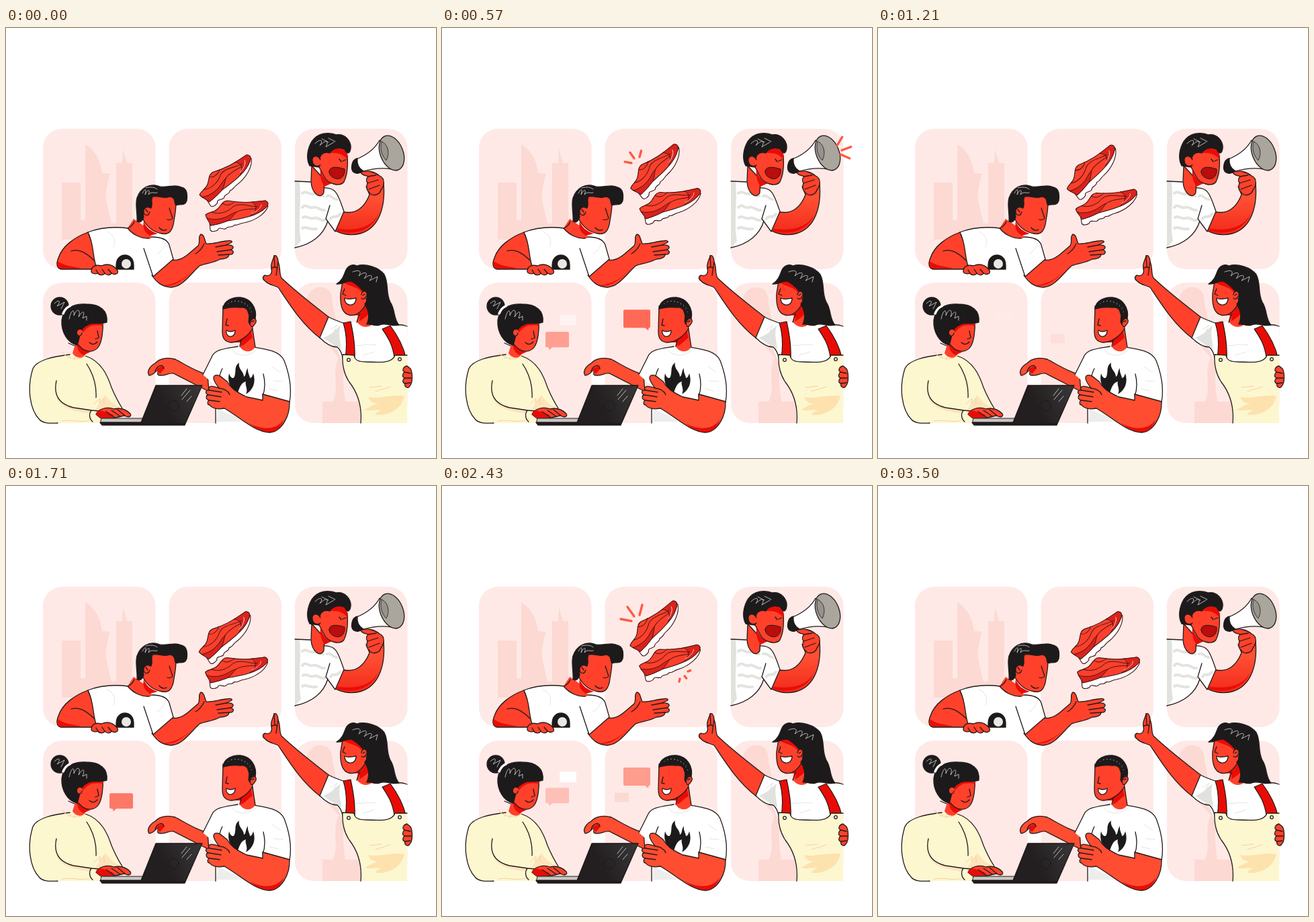
Recreate the animation shown at these times as an HTML page. Size 640 by 640 pixels, loop 3.57 s.

```html
<!DOCTYPE html>
<html lang="en">
<head>
<meta charset="utf-8">
<title>Community</title>
<style>
html, body { margin: 0; width: 100%; height: 100%; overflow: hidden; background: #fff; }
svg { display: block; width: 100vw; height: 100vh; }
path, circle, ellipse { stroke-linecap: round; stroke-linejoin: round; }
.s, .w, .c, .k, .l { stroke: #231a1a; stroke-width: 1.3; }
.s { fill: #ff412b; }
.a { fill: #ff4d31; }
.w { fill: #fff; }
.c { fill: #fdf7d0; }
.k { fill: #1d1a1b; }
.l { fill: none; }
.r { fill: #e90c06; }
.g { fill: #e1e2de; }
.p { fill: #fdd9d4; }
.h { fill: none; stroke: #ddd; stroke-width: .8; }
.t { fill: none; stroke: #e3e3df; stroke-width: 4; }
.f { fill: #fa402c; }
.y { fill: none; stroke: #f8cf9c; stroke-width: 1; }
.n { stroke: none; }
.spark path { fill: none; stroke: #ff5a43; stroke-width: 3.4; }
.shoe { stroke: #3a1013; stroke-width: 1.1; }
</style>
</head>
<body>
<svg viewBox="0 0 640 640">
<defs>
  <linearGradient id="dusk" x2="0" y2="1"><stop offset=".3" stop-color="#ff4f33"/><stop offset="1" stop-color="#f22a1a"/></linearGradient>
  <linearGradient id="lid" x2="1" y2="-.3"><stop offset=".2" stop-color="#231f20"/><stop offset="1" stop-color="#3c3a3a"/></linearGradient>
  <g id="shoe" class="shoe">
    <path fill="#fff" d="M303 288L304 300C305 304 311 303 315 301C317 295 322 300 327 299C331 293 336 299 340 293C344 295 349 290 354 290C370 287 386 277 390 265L386 258Z"/>
    <path class="f" d="M297 278C303 273 309 275 314 270C320 265 322 257 330 257C345 260 367 260 386 257C391 259 391 263 387 267C374 280 350 284 330 287C320 291 311 293 305 294C303 288 298 284 297 278Z"/>
    <path fill="#d9231b" stroke-width=".8" d="M299 283C309 286 319 285 328 281C334 278 338 275 343 274C338 279 335 284 330 287C320 291 311 293 305 294C303 290 301 287 299 283ZM366 259L386 257C391 259 391 263 387 267C380 274 371 278 363 280C373 273 375 265 366 259Z"/>
    <path fill="none" stroke-width=".9" d="M306 274C318 279 331 273 338 266C348 259 362 266 374 266M322 261C328 266 336 263 341 258M343 274C352 269 361 270 372 269"/>
    <path fill="none" stroke="#fff" stroke-width=".7" d="M380 263C380 268 373 273 366 276"/>
  </g>
</defs>

<g id="panels" fill="#fee9e6"></g>

<g class="p">
  <path d="M83 230H111V285L118 287V173C134 183 141 198 143 216L155 217C150 235 147 247 150 261L157 291H164V201H173L174 180L180 201H188V300L120 315H83Z"/>
  <path fill="#fee9e6" d="M111 230H118V286H111ZM155 217H164V290H157C150 262 147 240 155 217Z"/>
  <path d="M446 412C447 396 456 386 468 386C482 386 486 396 486 410L500 478L504 500C500 515 502 535 505 556H527V588H471V556H486C497 535 484 515 495 490L450 440Z"/>
</g>

<!-- catcher -->
<path class="s" d="M122 304C103 311 84 324 78 342C74 352 76 358 82 359H140L130 325Z"/>
<path class="r" d="M77 347C76 354 77 358 82 358H112C98 354 88 355 77 347Z"/>
<path class="l" d="M97 332C107 329 117 332 131 346"/>
<path class="s" d="M247 345C256 347 265 342 272 336L286 324C290 318 285 311 290 307C295 307 295 314 298 321C308 322 317 318 328 317C335 315 339 318 334 320L328 323C338 322 341 327 335 330C341 333 338 338 332 337C332 342 325 344 319 344C308 350 298 350 288 354C274 367 263 385 246 386C231 385 224 378 217 368Z"/>
<path class="r" d="M234 383C252 387 267 372 281 358C268 371 256 381 234 383Z"/>
<path class="l" d="M312 326L328 323M314 333L335 330M316 338L332 337M295 321C292 328 289 332 282 336"/>
<path fill="#fff" d="M122 304C140 297 160 295 182 298C192 309 215 310 236 315C243 320 245 332 249 344L219 370L213 359H136C128 343 132 323 122 304Z"/>
<path class="l" d="M122 304C140 297 158 295 182 298M216 311C230 311 240 314 243 323L249 344L219 370L205 328M122 304C132 323 128 343 136 359"/>
<path class="h" d="M150 303C161 307 164 317 160 326M225 336C231 333 236 325 238 319"/>
<path class="s n" d="M190 284L181 298C190 309 204 315 216 313L216 302Z"/>
<path class="l" d="M191 288C189 293 186 296 181 298C190 309 203 314 213 313"/>
<path class="r" d="M205 288C209 298 216 303 226 306L214 309C206 304 203 298 205 288Z"/>
<path class="s" d="M204 249H252C255 260 252 275 250 287C248 303 242 308 232 306C220 304 211 298 204 285Z"/>
<path class="k" d="M195 288C196 276 192 263 195 253C200 238 214 231 226 235C236 240 250 231 261 237C271 239 270 250 269 257C266 266 258 261 253 264C249 258 254 254 244 251C234 255 227 249 218 251C215 257 219 262 216 268C208 264 202 272 205 281C203 287 200 291 195 288Z"/>
<path class="s" d="M215 268C206 263 202 274 207 278C211 280 213 277 214 274"/>
<path class="l" d="M243 268L248 283C246 286 243 286 240 285M228 297C231 301 235 302 239 300M208 270L211 274"/>
<path class="h" d="M203 246C208 237 209 240 207 248C212 238 215 241 212 248C218 242 220 247 225 245M208 238C216 236 222 237 225 240"/>
<path class="k" d="M164 359V353C164 333 190 333 190 353V359Z"/><circle cx="179" cy="351" r="7" fill="#e8e8e4"/>
<path class="s" d="M127 361C128 354 134 352 142 354C151 350 160 352 166 361C168 366 162 368 157 365C155 369 149 368 147 365C145 369 138 368 137 365C132 367 126 365 127 361Z"/>
<path class="l" d="M137 365L134 360M147 365L143 359M157 365L152 359"/>

<g id="low"><use href="#shoe"/></g>
<g id="high"><use href="#shoe"/></g>
<g id="sparkA" class="spark"><path d="M282 201L266 198"/><path d="M286 194L276 180"/><path d="M294 192L298 177"/></g>
<g id="sparkB" class="spark"><path d="M354 287L351 299"/><path d="M361 283L369 292"/><path d="M366 276L377 272"/></g>

<!-- announcer -->
<path class="s" style="fill:url(#dusk)" d="M500 273C521 279 534 266 541 248L536 236L562 231C565 265 556 298 527 306C512 310 496 306 488 300Z"/>
<path class="r" d="M493 302C516 309 543 303 554 278C543 296 526 302 493 299Z"/>
<path fill="#fff" d="M430 228L453 229C460 239 472 240 483 238C494 246 498 258 503 273L490 303L479 287C473 308 455 322 430 327Z"/>
<path class="g" d="M430 228H437C440 260 434 290 439 317L430 327Z"/>
<path class="t" d="M441 246C447 241 450 248 456 247S466 251 472 250M441 267C447 260 451 270 457 267S468 273 474 271M442 282C448 278 452 286 458 283S468 288 474 286M441 298C447 294 451 301 462 299M478 250C484 247 486 255 492 255M483 284C487 277 491 285 497 277"/>
<path class="l" d="M430 228L453 229M473 238C492 237 494 248 503 273L490 303L476 284L482 264M479 287C473 308 455 322 430 327"/>
<path class="s" d="M455 205L454 229C455 246 468 256 473 245L474 226Z"/>
<path class="r" d="M468 211C472 223 478 230 485 231L474 236C469 229 467 220 468 211Z"/>
<path class="s" d="M467 178H504L508 190C509 203 508 219 503 229C497 237 479 232 474 222L466 207Z"/>
<path class="k" d="M452 205C446 194 449 179 455 169C465 155 480 155 492 159C505 157 514 169 513 179C512 188 507 188 504 181C497 177 487 179 482 186C474 184 467 187 467 196L466 207Z"/>
<path class="s" d="M468 196C463 187 455 191 456 198C457 206 464 207 468 204"/>
<path class="r" d="M483 186C488 178 500 178 504 183C509 187 509 190 508 195C499 186 494 186 483 186Z"/>
<path fill="#b90e0d" stroke="#231a1a" d="M481 214C481 207 489 205 504 210C505 218 500 227 490 224C485 222 481 219 481 214Z"/>
<path class="l" d="M496 195L499 199M506 196L501 198"/>
<path class="h" d="M460 172C468 164 473 167 467 175C477 165 481 168 476 177L488 170M470 165L480 170M480 164L490 169"/>
<path class="w" d="M556 167C548 182 534 190 522 195C517 203 520 211 529 214C546 209 566 207 581 212Z"/>
<path class="k" d="M523 194C514 196 512 211 518 215C523 218 528 215 532 213C525 209 522 202 523 194Z"/>
<ellipse cx="574" cy="186" rx="17" ry="27" transform="rotate(-22 574 186)" fill="#aaa59d" stroke="#231a1a" stroke-width="1.3"/>
<path fill="#96928c" stroke="#231a1a" stroke-width=".8" d="M559 169C568 172 572 186 566 197C559 190 556 179 559 169Z"/>
<path class="s" d="M528 215C537 210 550 215 556 220C565 224 563 235 558 241C556 249 545 251 541 245C536 241 536 235 538 231C535 227 537 223 539 221C535 219 530 220 528 215Z"/>
<path class="l" d="M539 221L551 219M538 231L554 226M540 240L556 234"/>
<g id="sparkC" class="spark"><path d="M588 175L597 160"/><path d="M595 182L611 176"/><path d="M593 188L609 195"/></g>

<g id="bubbles"></g>

<!-- typist -->
<path class="c n" d="M95 486C70 489 46 494 40 507C31 535 35 568 50 583C57 589 65 588 80 588H145L173 566C166 554 162 546 157 535C151 517 143 496 118 488Z"/>
<path fill="#fde4bd" d="M74 548C83 562 104 568 127 569L126 574C106 571 82 569 74 548ZM148 546C157 560 164 562 173 566L160 571C150 565 139 569 132 569Z"/>
<path class="l" d="M95 486C70 489 46 494 40 507C31 535 35 568 50 583C56 589 65 588 77 588M118 488C142 496 151 517 157 535C162 547 166 555 173 566M75 525C70 548 80 560 100 565L127 569C123 574 124 582 129 586M120 500C130 515 135 530 134 550M127 569L138 570"/>
<path class="y" d="M84 482C91 493 110 496 119 487M87 488L91 484M93 492L96 487M101 494L103 489M110 493L110 488M131 560L140 551L139 559L146 551V560M83 585C100 582 111 588 124 584"/>
<path class="s n" d="M104 468L99 484C104 492 114 493 118 486L119 477Z"/>
<path class="r" d="M106 469C111 478 118 481 126 482L115 487C108 483 105 476 106 469Z"/>
<path class="s" d="M106 436H144C145 449 143 466 138 474C132 483 121 483 113 477L104 468Z"/>
<path class="r" d="M112 449C119 437 132 440 144 438V443C131 441 122 443 115 453Z"/>
<circle class="k" cx="80" cy="414" r="13"/>
<path class="k" d="M106 472C92 469 82 453 83 435C85 418 100 410 119 411C141 411 152 421 150 438C140 442 128 436 118 444C109 449 111 458 106 472Z"/>
<path fill="none" stroke="#fff" stroke-width="3.5" d="M85 425C87 420 90 416 95 414"/>
<path class="s" d="M113 449C105 445 103 456 108 458C111 459 113 456 113 454"/>
<path class="l" d="M136 451L138 461L133 463M124 468C128 472 133 471 136 467M93 469L102 473"/>
<path class="h" d="M94 433C97 419 102 417 101 428C106 415 112 420 108 430C115 419 118 421 114 432L120 429V435M72 410C78 404 83 405 76 414L87 408L82 418"/>
<path class="s" d="M134 575C137 567 150 563 161 567C170 565 179 568 185 574C188 579 181 580 176 577L163 580H140Z"/>
<path class="r" d="M134 575C136 568 141 569 147 571L160 576L157 580H140Z"/>
<path class="l" d="M149 571L161 579M157 569L170 578M166 568L177 577"/>

<!-- speaker -->
<path class="s a" d="M300 516C282 511 267 501 252 493C241 490 229 491 222 499C214 503 209 512 213 517C220 517 222 511 226 509C227 513 223 517 230 517C239 518 241 513 249 514L302 541Z"/>
<path class="r" d="M224 508C230 501 238 504 234 509L229 515Z"/>
<path class="l" d="M222 511C225 501 235 500 235 507"/>
<path fill="#fff" d="M345 474C327 477 312 478 307 488C300 499 296 506 293 516L314 534L312 588H382L384 546L422 556C425 535 420 513 414 495C407 481 388 478 369 475Z"/>
<path class="g" d="M315 566C330 574 340 577 352 586H313Z" opacity=".6"/>
<path class="l" d="M345 474C327 477 312 478 307 488L293 516M312 540V588M383 515C387 531 385 540 382 548M369 475C388 478 408 481 414 495C421 513 426 535 422 557L382 545M322 507C318 514 317 520 316 530"/>
<path class="h" d="M336 478C342 490 364 490 374 477M396 504L408 512M398 525L412 526M392 537L405 540"/>
<path class="k n" d="M345 543C334 538 329 527 332 514C334 521 338 523 340 519C343 511 339 504 347 498C345 508 354 511 354 519C358 517 356 511 360 506C359 513 363 517 363 521C366 521 367 517 368 514C372 526 369 538 357 545C361 537 355 532 357 526C351 528 348 533 345 543Z"/>
<path class="s n" d="M350 462L348 474C353 483 365 484 371 475L367 448Z"/>
<path class="r" d="M338 468C350 466 359 460 364 449L367 461C360 466 356 471 350 474V468Z"/>
<path class="l" d="M350 464L348 474M367 448L371 475"/>
<path class="s" d="M323 414H362L367 447C361 458 348 468 335 468C324 467 322 460 322 451Z"/>
<path class="k" d="M323 418C324 406 337 400 349 401C365 403 374 417 371 433C369 430 365 431 364 442C358 438 364 430 361 425C360 418 356 415 349 416C340 415 331 416 323 418Z"/>
<path class="s" d="M364 436C369 428 376 435 370 441C368 445 365 445 364 443"/>
<path class="w" d="M328 450C333 453 337 452 341 450C341 457 337 460 332 459C329 457 327 454 328 450Z"/>
<path class="l" d="M329 433L327 442L331 443M365 437L369 436"/>
<path class="h" stroke-dasharray=".1 5" d="M331 410C342 403 356 407 365 418M336 407C350 404 362 413 367 426"/>
<path class="s a" d="M422 556C423 578 410 601 392 602C370 601 349 580 325 566C315 568 306 566 303 561C299 561 300 555 302 554C296 552 298 546 301 546C295 543 298 538 302 539C300 532 307 532 317 536C311 528 306 520 311 517C318 515 323 522 329 526C334 535 341 541 358 549L382 554V545Z"/>
<path class="r" d="M362 588C380 598 402 600 414 582C408 596 402 602 391 601C379 600 370 595 362 588Z"/>
<path class="l" d="M302 539L321 542M301 546L320 549M302 554L318 556M317 536C327 537 331 541 333 546"/>

<!-- laptop -->
<path fill="#c9c5c1" stroke="#231a1a" d="M142 581H204L201 588H141Z"/>
<path class="k" d="M140 587H201L223 532H292L266 591H143Z"/>
<path fill="url(#lid)" d="M224 533H291L266 588H202Z"/>
<circle cx="249" cy="562" r="8" fill="none" stroke="#1d1a1b"/>
<path class="h" d="M261 547L269 537M262 553L274 539M269 556L276 548"/>

<!-- waver -->
<path class="s" d="M480 430C457 412 432 393 410 372C406 365 409 356 405 348C405 342 402 337 399 339C398 345 393 351 395 358C397 367 391 370 386 368C382 369 381 373 385 376C390 382 399 383 405 386C421 410 440 441 468 462Z"/>
<path class="l" d="M399 339L400 355M405 348L402 368M395 358C399 355 401 355 403 357"/>
<path fill="#fff" d="M480 430C493 436 508 440 520 437L560 440L597 443V500H501C498 488 495 480 490 475C481 472 474 467 467 461Z"/>
<path class="g" d="M472 461C486 456 491 448 498 443C494 457 498 466 499 478L492 475Z"/>
<path class="l" d="M505 440C496 437 487 434 480 430L467 461C475 469 485 475 493 475C498 479 500 484 501 492M584 442C590 441 594 443 597 444"/>
<path class="h" d="M483 449L493 442L488 451L497 446M517 472C531 474 537 469 551 472M532 487L548 482"/>
<path class="s n" d="M525 422L522 437C529 447 540 447 546 440L540 412Z"/>
<path class="r" d="M514 427C526 427 532 421 535 412L541 424C535 432 530 433 526 437V428Z"/>
<path class="s" d="M501 377H530L537 406C533 421 521 430 510 427C500 424 497 412 498 395Z"/>
<path class="r" d="M502 378C510 385 522 384 530 394L535 377L517 371Z"/>
<path class="k" d="M492 381C501 376 503 367 506 360C510 353 516 351 522 354C535 350 555 356 563 367C570 380 565 395 572 408C580 420 576 432 585 442C575 445 566 438 556 442C548 444 543 440 537 441C542 430 539 419 534 411C541 403 536 395 531 391C525 384 520 380 514 377C507 376 501 382 492 381Z"/>
<path class="s" d="M529 397C530 389 538 391 537 398C535 403 531 405 529 402"/>
<path class="w" d="M504 402C510 405 515 403 521 402C521 409 517 413 511 412C506 411 504 407 504 402Z"/>
<path class="l" d="M504 388L501 396L506 398M531 398L534 396M526 426L522 438"/>
<path class="h" d="M516 363C526 359 530 362 525 369C535 361 540 364 533 373C543 365 548 368 541 376L553 370L551 378"/>
<path class="r" stroke="#231a1a" stroke-width="1.2" d="M502 439L513 437C517 455 520 471 519 491H505C508 471 507 455 502 439ZM560 448L572 443C583 458 591 472 595 490H578C575 470 568 460 560 448Z"/>
<path class="c n" d="M501 486L518 487C519 495 525 497 538 497C557 498 575 499 579 487H597V588H528C530 565 525 545 511 527C503 515 500 501 501 486Z"/>
<path class="l" d="M528 588C530 565 525 545 511 527C503 515 500 501 501 486L518 487C519 495 525 497 538 497C557 498 575 499 579 487H597"/>
<path fill="#fde2ae" d="M539 549C554 553 577 544 593 548C590 563 575 577 551 576C547 574 555 570 560 569C550 567 540 571 534 568C541 565 546 560 555 559C547 559 541 556 539 549Z"/>
<path class="y" d="M541 535L559 533M550 541L572 534"/>
<circle class="w" cx="510" cy="494" r="2.3"/><circle class="w" cx="586" cy="493" r="2.3"/>
<path class="s" d="M597 503C591 504 589 510 593 512C589 516 590 520 593 521C589 525 591 529 594 529C592 535 599 537 601 533C606 528 605 512 602 507Z"/>
<path class="l" d="M593 512L602 514M593 521L603 521M594 529L602 528"/>
</svg>
<script>
const LOOP = 3570, CYCLE = LOOP / 2, STEP = LOOP / 50;
const $ = id => document.getElementById(id);
const clamp = v => Math.max(0, Math.min(1, v));

$("panels").innerHTML = [150, 379].map(y => [55, 242.5, 430].map(x =>
  `<rect x="${x}" y="${y}" width="167.5" height="209" rx="28"/>`).join("")).join("");

// x, y, width, height, tail side, colour, start times, rise per ms, opacity by age
const bubbles = [
  [154, 458, 35, 23, -1, "#ff604c", [50, 1640], .0112, a => Math.min(a / 90, 1 - a / 1130)],
  [270, 419.5, 40, 27, 1, "#ff6a56", [400, 2000], .001, a => Math.min(a / 120, (790 - a) / 600)],
  [257, 457, 21, 14, 0, "#fac4bc", [640, 2250], .003, a => Math.min(a / 400, (800 - a) / 800)],
  [175, 428, 25, 16, 0, "#fff", [480, 2150], .011, a => Math.min(a / 200, (800 - a) / 550)]
].map(([x, y, w, h, tail, color, starts, rise, alpha]) => {
  const tx = tail < 0 ? x + 4 : x + w - 9;
  const tip = tail ? `<path d="M${tx} ${y + h - 1}h7l${tail < 0 ? -5 : -1} 5z"/>` : "";
  $("bubbles").insertAdjacentHTML("beforeend",
    `<g fill="${color}"><rect x="${x}" y="${y}" width="${w}" height="${h}" rx="2"/>${tip}</g>`);
  return { el: $("bubbles").lastChild, starts, rise, alpha };
});

for (const p of document.querySelectorAll(".spark path")) p.setAttribute("pathLength", 1);

// Each stroke grows outward, then its inner end follows.
function spark(id, age, grow, hold, shrink) {
  const head = clamp(age / grow), tail = clamp((age - hold) / shrink);
  const g = $(id);
  g.style.display = age > 0 && tail < 1 ? "" : "none";
  g.style.strokeDasharray = `0 ${tail} ${head - tail} 3`;
}

function shoe(id, k, x, y, angle, dx, dy, turn) {
  $(id).setAttribute("transform",
    `translate(${x + dx * k} ${y + dy * k}) rotate(${angle + turn * k}) translate(-343 -280)`);
}

function draw(now) {
  const t = Math.floor((now % LOOP + 4) / STEP) * STEP % LOOP;
  const c = t % CYCLE, p = c / CYCLE;
  const k = p < .48 ? p / .48 : (1 - p) / .52;
  shoe("low", k, 343, 280, 0, -4.5, -21, -9);
  shoe("high", k, 330, 229, -27, -14, -20, -8);
  spark("sparkA", c - 460, 180, 200, 240);
  spark("sparkB", c - 580, 180, 200, 200);
  spark("sparkC", t < 1500 ? t - 430 : t - 1850, 165, 200, 220);
  for (const b of bubbles) {
    const age = t - (t < b.starts[1] ? b.starts[0] : b.starts[1]);
    b.el.setAttribute("opacity", clamp(b.alpha(age)));
    b.el.setAttribute("transform", `translate(0 ${-age * b.rise})`);
  }
}

const begin = performance.now();
(function loop() {
  draw(performance.now() - begin);
  requestAnimationFrame(loop);
})();
</script>
</body>
</html>
```
